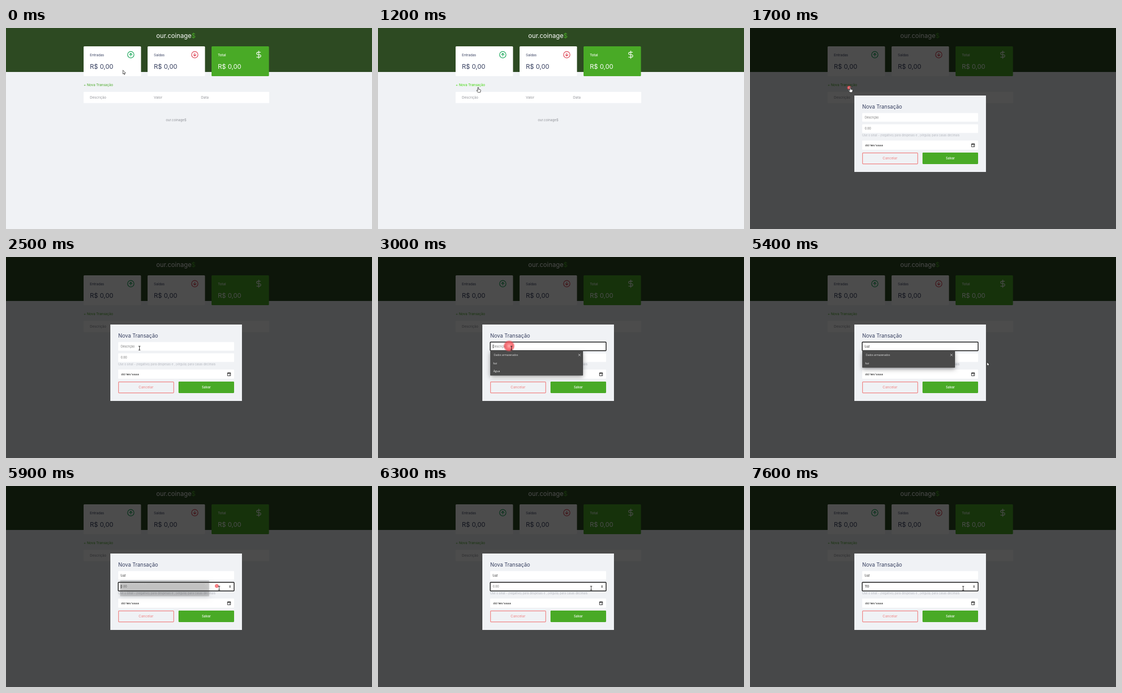
An HTML page with a canvas for the animation above (8000 ms loop, 698 by 384 pixels).

```html
<!DOCTYPE html>
<html lang="pt-BR">
<head>
<meta charset="utf-8">
<title>Nova Transação</title>
<style>
html, body { margin: 0; width: 100%; height: 100%; overflow: hidden; background: #f0f2f5; }
canvas { display: block; }
</style>
</head>
<body>
<canvas id="stage" width="698" height="384"></canvas>
<script>
const ctx = document.getElementById('stage').getContext('2d');
const LOOP = 8000, STEP = 100;
const UI = 'Inter, sans-serif', MENU = '"Open Sans", sans-serif', MONO = '"Liberation Mono", monospace';
const BRAND = 'our.coinage', GREEN = '#49aa26', INK = '#363f5f', GREY = '#8f9197';

// Pointer keys: time, x, y
const PATH = [
  [0, 223, 81], [100, 361, 55], [200, 220, 78], [300, 232.5, 75], [400, 232.5, 75],
  [900, 192.5, 113], [1100, 192.5, 113], [1200, 191, 113], [1700, 191, 113],
  [2500, 254.5, 174], [4800, 254.5, 174], [5300, 467, 203], [5700, 406.5, 195],
  [7200, 406.5, 195], [7300, 406.5, 195.3], [LOOP, 406.5, 195.3]
];
const CLICKS = [[1600, 189, 114], [2700, 250, 170], [5800, 402, 191]];
const FIELDS = { name: 162.5, value: 184 };

function text(str, x, y, size, color, { font = UI, weight = 400, align = 'left' } = {}) {
  ctx.font = `${weight} ${size}px ${font}`;
  ctx.textAlign = align;
  ctx.fillStyle = color;
  ctx.fillText(str, x, y);
  return ctx.measureText(str).width;
}

function box(x, y, w, h, color, radius = 0) {
  ctx.fillStyle = color;
  ctx.beginPath();
  ctx.roundRect(x, y, w, h, radius);
  ctx.fill();
}

function frame(x, y, w, h, color, width, radius) {
  ctx.strokeStyle = color;
  ctx.lineWidth = width;
  ctx.beginPath();
  ctx.roundRect(x, y, w, h, radius);
  ctx.stroke();
}

function at(x, y, scale, draw) {
  ctx.save();
  ctx.translate(x, y);
  ctx.scale(scale, scale);
  draw();
  ctx.restore();
}

function line(d, color, width) {
  ctx.strokeStyle = color;
  ctx.lineWidth = width;
  ctx.lineCap = ctx.lineJoin = 'round';
  ctx.stroke(new Path2D(d));
}

function arrowIcon(x, color, flip) {
  at(x, 51, 1, () => {
    ctx.scale(1, flip);
    line('M6.1 0A6.1 6.1 0 1 1 -6.1 0A6.1 6.1 0 1 1 6.1 0M0 2.6V-2.6M-2.5 -.1L0 -2.6L2.5 -.1', color, 1.2);
  });
}

function card(x, label, fill, color, weight) {
  box(x, 35, 109.5, 57, fill, 1.6);
  text(label, x + 12, 53.5, 6.5, color, { weight });
  text('R$ 0,00', x + 12, 77.8, 12.1, color);
}

function page(hover) {
  box(0, 0, 698, 384, '#f0f2f5');
  box(0, 0, 698, 84, '#2d4a22');
  const w = text(BRAND, 286.5, 18.7, 12.1, '#fff');
  text('$', 286.5 + w, 18.7, 12.1, GREEN);
  card(148, 'Entradas', '#fff', INK, 400);
  card(270, 'Saídas', '#fff', INK, 400);
  card(392, 'Total', GREEN, '#fff', 500);
  arrowIcon(238, '#12a454', -1 * -1);
  arrowIcon(360, '#dc4050', -1);
  at(482, 51, 0.66, () => line('M0 -11V11M5 -7H-2.5a3.5 3.5 0 0 0 0 7h5a3.5 3.5 0 0 1 0 7H-6', '#fff', 1.8));
  text('+ Nova Transação', 148, 111.3, 6.5, hover ? '#3dd705' : GREEN);
  box(148, 122, 354, 21.5, '#fff', 1);
  text('Descrição', 160, 134.8, 6.5, GREY);
  text('Valor', 282, 134.8, 6.6, GREY);
  text('Data', 372, 134.8, 6.6, GREY);
  text(BRAND + '$', 324.5, 178.2, 6.3, GREY, { align: 'center' });
}

function field(y, value, placeholder, focused, caret) {
  box(214, y, 221, 16.5, '#fff', 1);
  if (focused) frame(214, y, 221, 16.5, '#101010', 1.4, 1);
  const base = y + 10;
  const w = text(value || placeholder, 219, base, 5.5, value ? '#111' : '#757575');
  if (focused && caret) box(219 + (value ? w : 0), y + 4.8, 0.8, 7, '#111');
}

function modal(s) {
  box(199, 129, 251, 146, '#f0f2f5');
  text('Nova Transação', 214, 154.3, 9.9, INK);
  field(FIELDS.name, s.name, 'Descrição', s.focus === 'name', s.caret);
  field(FIELDS.value, s.value, '0.00', s.focus === 'value', s.caret);
  if (s.spinner) {
    box(425, 189, 4.4, 6, '#efefef');
    ctx.fillStyle = '#333';
    ctx.fill(new Path2D('M425.8 191.6L427.2 189.8L428.6 191.6ZM425.8 192.6L427.2 194.4L428.6 192.6Z'));
  }
  text('Use o sinal - (negativo) para despesas e , (vírgula) para casas decimais', 214, 207.2, 5.5, '#b4b7bf');
  box(214, 215, 221, 17.5, '#fff', 1);
  text('dd/mm/aaaa', 219.5, 226, 5.7, '#111', { font: MONO });
  line('M422.8 221.4H428.2V227H422.8ZM422.8 222.6H428.2M424 220.6V221.4M427 220.6V221.4M425.8 225.2H427', '#222', 0.9);
  frame(214.6, 238.6, 105.2, 21, '#ef8080', 1.2, 1);
  text('Cancelar', 267, 251.4, 6.6, '#ef8080', { align: 'center' });
  box(329, 238, 106, 22, GREEN, 1.4);
  text('Salvar', 382, 251.2, 5.7, '#fff', { align: 'center', weight: 500 });
}

function dropdown(rows, alpha, scale) {
  if (alpha <= 0) return;
  const h = 17 + rows.length * 15;
  ctx.save();
  ctx.globalAlpha = alpha;
  ctx.translate(302.5, 179.5 + h / 2);
  ctx.scale(scale, scale);
  ctx.translate(-302.5, -179.5 - h / 2);
  ctx.shadowColor = 'rgba(0,0,0,.35)';
  ctx.shadowBlur = 9;
  ctx.shadowOffsetY = 3;
  box(214, 179.5, 177, h, '#4a4a4a', 1);
  ctx.shadowColor = 'transparent';
  text('Dados armazenados', 221, 189, 4.8, '#e4e4e4', { font: MENU });
  line('M382.4 185.4L386 189M386 185.4L382.4 189', '#eee', 0.7);
  rows.forEach((row, i) => text(row, 220, 204.6 + i * 15, 5.3, '#fff', { font: MENU, weight: 500 }));
  ctx.restore();
}

function ripple(t, [start, x, y]) {
  const age = t - start;
  if (age <= 0 || age >= 500) return;
  const r = Math.min(11, 0.4 + age * 0.036);
  const glow = ctx.createRadialGradient(x, y, 0, x, y, r);
  glow.addColorStop(0, 'rgba(255,165,165,.9)');
  glow.addColorStop(0.4, 'rgba(250,110,115,.9)');
  glow.addColorStop(0.75, 'rgba(236,72,80,.8)');
  glow.addColorStop(1, 'rgba(236,80,85,.1)');
  ctx.globalAlpha = age <= 300 ? 1 : (500 - age) / 250;
  ctx.fillStyle = glow;
  ctx.beginPath();
  ctx.arc(x, y, r, 0, Math.PI * 2);
  ctx.fill();
  ctx.globalAlpha = 1;
}

const POINTERS = {
  arrow: 'M0 0V7L1.6 5.6L2.7 8L3.8 7.5L2.8 5.2L4.8 5Z',
  hand: 'M-.8 .7Q0 -.6 .9 .7V4L4.2 4.8Q5.2 5.2 4.9 6.4L4 10H-.4L-3 6.4Q-2.7 5 -1.3 6L-.8 6.5Z'
};

function pointer(kind, x, y) {
  at(x, y, 1, () => {
    if (kind === 'beam') return line('M-1.5 -3.6H1.5M0 -3.6V3.8M-1.5 3.8H1.5', '#222', 0.9);
    ctx.fillStyle = '#fff';
    ctx.fill(new Path2D(POINTERS[kind]));
    line(POINTERS[kind], '#222', 0.8);
  });
}

function position(t) {
  const i = PATH.findIndex(key => key[0] > t);
  const [t0, x0, y0] = PATH[i - 1], [t1, x1, y1] = PATH[i];
  const k = (t - t0) / (t1 - t0);
  return [x0 + (x1 - x0) * k, y0 + (y1 - y0) * k];
}

// Letters appear one by one at the given times
const typed = (word, times, t) => word.slice(0, times.filter(time => t >= time).length);

function draw(t) {
  const open = t >= 1700, [x, y] = position(t);
  const hover = t >= 800 && !open;
  const focus = t >= 5800 ? 'value' : t >= 2700 ? 'name' : '';
  const lastInput = [2700, 4100, 4400, 4500, 5800, 6800, 7000, 7100].filter(time => time <= t).pop();
  const caret = Math.floor((t - lastInput) / 500) % 2 === 0;
  const name = typed('Luz', [4100, 4400, 4500], t);
  const value = typed('110', [6800, 7000, 7100], t);

  page(hover);
  if (open) {
    box(0, 0, 698, 384, 'rgba(0,0,0,.7)');
    modal({ name, value, focus, caret, spinner: t >= 5600 });
    const closing = Math.max(0, t - 5700);
    const alpha = t < 2700 ? 0 : t < 2800 ? 0.5 : closing ? 0.6 - 0.35 * (closing / 100 - 1) : 1;
    dropdown(name ? ['luz'] : ['luz', 'Água'], closing > 200 ? 0 : alpha, closing ? 0.96 : 1);
  }
  CLICKS.forEach(click => { if (open) ripple(t, click); });

  const inField = top => x > 214 && x < 435 && y > top && y < top + 16.5;
  const covered = t >= 2700 && t < 5700 && x < 391;
  const beam = open && (inField(FIELDS.name) || (inField(FIELDS.value) && !covered));
  pointer(beam ? 'beam' : hover || t === 1700 ? 'hand' : 'arrow', x, y);
}

const origin = performance.now();
function tick() {
  const t = (performance.now() - origin) % LOOP;
  draw(Math.floor(t / STEP) * STEP);
  requestAnimationFrame(tick);
}
tick();
</script>
</body>
</html>
```
